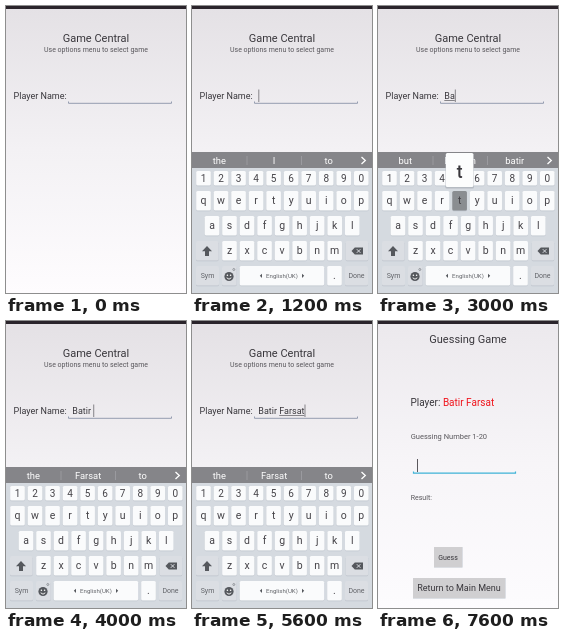
These frames come from a looping animation (180 px wide and 287 px high, 8 s). An HTML page:

```html
<!DOCTYPE html>
<html lang="en">
<head>
<meta charset="utf-8">
<title>Game Central</title>
<style>
  html, body { margin: 0; width: 100%; height: 100%; overflow: hidden; background: #f3f1f4; }
  svg { display: block; width: 100vw; height: 100vh; }
  text { font-family: Roboto, "Open Sans", sans-serif; fill: #39373c; white-space: pre; }
  .mid { text-anchor: middle; }
  .title { font-size: 11px; }
  .field { font-size: 9px; }
  .player { font-size: 10px; }
  .note { font-size: 7.5px; }
  .small { font-size: 7px; }
  .soft { fill: #59575c; }
  .name { fill: #f0141c; }
  .key { fill: #fafbfc; }
  .key.dark { fill: #dbdee3; }
  .key.down { fill: #8a8d91; }
  .shade { fill: #bdc3cb; }
  .letter { font-size: 10.5px; fill: #454348; }
  .digit { font-size: 10px; fill: #454348; }
  .label { font-size: 7px; fill: #616368; }
  .tip { font-size: 9.4px; fill: #fff; }
  .icon { fill: #55585d; }
  .icon.on { fill: #2387c9; }
  .button { fill: #d0cfd1; }
</style>
</head>
<body>
<svg viewBox="0 0 180 287" preserveAspectRatio="none">
  <defs>
    <linearGradient id="menuBg" x1="0" y1="0" x2="0" y2="1">
      <stop offset="0" stop-color="#e4e1e5"/>
      <stop offset=".5" stop-color="#f3f1f4"/>
      <stop offset="1" stop-color="#fefcfe"/>
    </linearGradient>
    <linearGradient id="gameBg" x1="0" y1="0" x2="0" y2="1">
      <stop offset="0" stop-color="#ebe8ec"/>
      <stop offset=".5" stop-color="#f7f5f8"/>
      <stop offset="1" stop-color="#fdfcfe"/>
    </linearGradient>
  </defs>

  <g id="menu">
    <rect width="180" height="287" fill="url(#menuBg)"/>
    <text class="title mid" x="90" y="35.5">Game Central</text>
    <text class="small soft mid" x="90" y="46">Use options menu to select game</text>
    <text class="field" x="7.6" y="93">Player Name:</text>
    <path d="M62.5 95.5V97.3H165.5V95.5" fill="none" stroke="#959db0" stroke-width="1"/>
    <text id="typed" class="field" x="66.3" y="93"></text>
    <rect id="under" y="94.3" height=".7" fill="#5a585d"/>
    <rect id="caret" y="83.5" width="1" height="12.5" fill="#858388"/>
  </g>

  <g id="game">
    <rect y="-10" width="180" height="307" fill="url(#gameBg)"/>
    <text class="title mid" x="90" y="22.3">Guessing Game</text>
    <text class="player" x="32.5" y="84.5">Player: <tspan class="name">Batir Farsat</tspan></text>
    <text class="note soft" x="32.7" y="118.3">Guessing Number 1-20</text>
    <path d="M35.5 150.5V152.2H137.5V150.5" fill="none" stroke="#3fb3d8" stroke-width="1.2"/>
    <rect id="caret2" x="39" y="138" width="1" height="13" fill="#5a585d"/>
    <text class="small soft" x="32.7" y="179">Result:</text>
    <rect class="shade" x="56" y="226" width="28.5" height="20.5"/>
    <rect class="button" x="56" y="226" width="28" height="20"/>
    <text class="small mid" x="70" y="238.7">Guess</text>
    <rect class="shade" x="35" y="257" width="92.5" height="20.5"/>
    <rect class="button" x="35" y="257" width="92" height="20"/>
    <text class="field mid" x="81" y="270.3">Return to Main Menu</text>
  </g>

  <g id="board">
    <rect y="161" width="180" height="127" fill="#d5dae0"/>
    <rect y="146" width="180" height="16" fill="#858589"/>
    <g id="tips"></g>
    <g id="keys"></g>
    <path id="shift" class="icon" d="M15 240L20 245.2H17V250H13V245.2H10Z"/>
    <path class="icon" d="M159.5 245L162.8 241.5H171V248.5H162.8Z"/>
    <path d="M164.8 243.2l3.6 3.6m0-3.6l-3.6 3.6" stroke="#dbdee3" stroke-width="1"/>
    <circle class="icon" cx="37" cy="270.5" r="4.6"/>
    <circle cx="35.4" cy="269.2" r=".8" fill="#fff"/>
    <circle cx="38.6" cy="269.2" r=".8" fill="#fff"/>
    <path d="M34.7 271.8Q37 274.6 39.3 271.8" fill="none" stroke="#fff" stroke-width=".9"/>
    <circle cx="41.8" cy="263.5" r="1" fill="none" stroke="#777b81" stroke-width=".7"/>
    <path class="icon" d="M70 267.7V271.9L67.8 269.8ZM110 267.7V271.9L112.2 269.8Z"/>
    <g id="pop">
      <rect x="-14.3" y="-37.6" width="28.6" height="35" rx="1.5" fill="#8f959d" opacity=".45"/>
      <rect x="-13.8" y="-38" width="27.6" height="34" rx="1.5" fill="#fcfdfd"/>
      <text id="popText" class="mid" y="-13" font-size="17.5" font-weight="500"></text>
    </g>
  </g>

  <rect width="180" height="3" fill="#2a242b"/>
</svg>
<script>
const $ = id => document.getElementById(id);
const clamp = v => Math.min(1, Math.max(0, v));

function add(parent, tag, attrs, label) {
  const el = document.createElementNS("http://www.w3.org/2000/svg", tag);
  for (const k in attrs) el.setAttribute(k, attrs[k]);
  if (label) el.textContent = label;
  return parent.appendChild(el);
}

const keys = {};

function addKey(name, x, y, w, h, kind, label, size, drop) {
  const box = { x, width: w, height: h, rx: 1.5 };
  add($("keys"), "rect", { ...box, y: y + .7, class: "shade" });
  const rect = add($("keys"), "rect", { ...box, y, class: "key" + kind });
  const text = add($("keys"), "text", { x: x + w / 2, y: y + drop, class: "mid " + size }, label);
  keys[name] = { rect, text, x: x + w / 2, y };
}

function addRow(chars, x, y, h, size, drop) {
  [...chars].forEach((c, i) => addKey(c, x + i * 17.53 - 7.3, y, 14.6, h, "", c, size, drop));
}

addRow("1234567890", 11.5, 165, 14.5, "digit", 11);
addRow("qwertyuiop", 11.5, 185, 19.5, "letter", 13.3);
addRow("asdfghjkl", 20, 210, 19.5, "letter", 13.3);
addRow("zxcvbnm", 37.5, 235, 19.5, "letter", 13.3);
addKey("shift", 4, 235, 22.5, 19.5, " dark", "", "", 0);
addKey("back", 153.7, 235, 22.5, 19.5, " dark", "", "", 0);
addKey("sym", 4, 260, 23, 19.5, " dark", "Sym", "label", 12.3);
addKey("face", 30, 260, 14.6, 19.5, " dark", "", "", 0);
addKey("space", 47.7, 260, 84.5, 19.5, "", "English(UK)", "label", 12);
keys.space.text.style.fontSize = "6.1px";
addKey(".", 135.2, 260, 14.6, 19.5, "", ".", "letter", 13.3);
addKey("done", 153, 260, 23, 19.5, " dark", "Done", "label", 12.3);

const first = "Batir", last = "Farsat";
const common = ["the", "I", "to"];
const forB = ["but", "Bahrain", first.toLowerCase()];
const forLast = ["the", last, "to"];
const done = [last + "'s", last];

// Each step: start, text, composing start, caret, pressed key, shift, tips
const steps = [
  [0, "", 0, 0, "", 0, common],
  [600, "", 0, 1, "", 0, common],
  [1600, "", 0, 0, "", 0, common],
  [1800, "b", 0, 1, "", 0, common],
  [2200, "b", 0, 1, "", 0, forB],
  [2400, "", 0, 1, "shift", 1, common]
];

function typeWord(word, before, start, tips) {
  [...word].forEach((c, i) => steps.push(
    [start + i * 200, before + word.slice(0, i), before.length, 1, c.toLowerCase(), i === 0, tips]));
  steps.push([start + word.length * 200, before + word, before.length, 1, "", 0, tips]);
}

typeWord(first, "", 2600, forB);
steps.push([4000, first + " ", 6, 1, "", 0, forLast], [4200, first + " ", 6, 1, "", 1, forLast]);
typeWord(last, first + " ", 4400, forLast);
steps.push([6000, first + " " + last, 6, 0, "", 0, done], [6400, first + " " + last, 6, 1, "", 0, done]);

function showTips(words) {
  const box = $("tips"), three = words.length === 3, cell = three ? 54.7 : 60;
  box.textContent = "";
  words.forEach((w, i) => {
    add(box, "text", { x: cell * (i + .5), y: 157.6, class: "mid tip" }, w);
    if (i) add(box, "rect", { x: cell * i, y: 150, width: .6, height: 9, fill: "#a9a9ad" });
  });
  if (three) add(box, "path", { d: "M169.5 151L173.3 154.5L169.5 158", fill: "none", stroke: "#fff", "stroke-width": 1.3 });
}

function showStep([, text, from, caret, press, shift, tips]) {
  const typed = $("typed"), x0 = 66.3;
  const at = n => n ? x0 + typed.getSubStringLength(0, n) : x0;
  typed.textContent = text;
  const end = at(text.length), begin = at(Math.min(from, text.length));
  $("caret").setAttribute("x", end);
  $("caret").style.opacity = caret ? 1 : 0;
  $("under").setAttribute("x", begin);
  $("under").setAttribute("width", end - begin);
  for (const k in keys) {
    keys[k].rect.classList.toggle("down", k === press);
    if (/^[a-z]$/.test(k)) keys[k].text.textContent = shift ? k.toUpperCase() : k;
  }
  $("shift").classList.toggle("on", !!shift);
  const pop = press.length === 1;
  $("pop").style.display = pop ? "" : "none";
  if (pop) {
    $("pop").setAttribute("transform", `translate(${keys[press].x} ${keys[press].y})`);
    $("popText").textContent = keys[press].text.textContent;
  }
  showTips(tips);
}

function place(id, y, alpha) {
  $(id).setAttribute("transform", `translate(0 ${y})`);
  $(id).style.opacity = alpha;
}

let shown = -1;

function draw() {
  const t = Math.floor(performance.now() % 8000 / 200) * 200;
  if (t !== shown) {
    shown = t;
    showStep(steps.filter(s => s[0] <= t).pop());
    const rise = t < 600 ? 1 : 1 - clamp((t - 400) / 800);
    const fall = clamp((t - 6400) / 600) ** 3;
    place("board", 176 * rise ** 3 + 54 * fall, (1 - rise ** 1.4) * (1 - fall));
    const left = t < 6400 ? 1 : 1 - clamp((t - 6200) / 600);
    place("game", 23 * left ** 3, 1 - left ** 2);
    $("caret2").style.opacity = t < 7000 || t >= 7600 ? 1 : 0;
  }
  requestAnimationFrame(draw);
}
draw();
</script>
</body>
</html>
```
